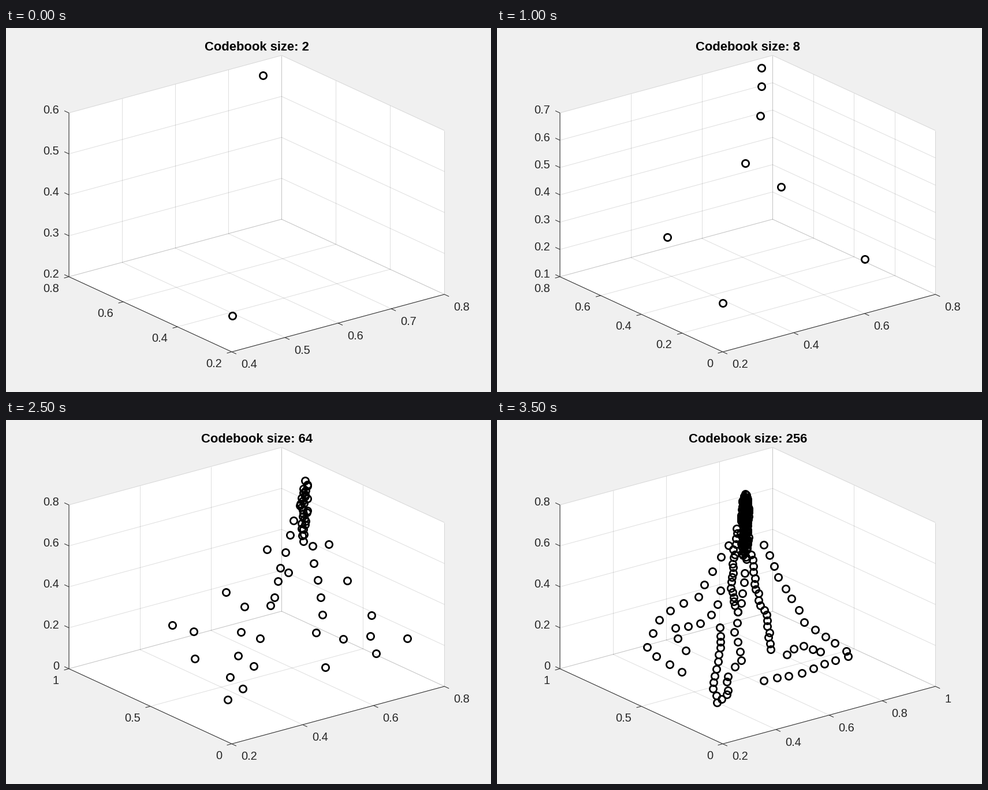
A matplotlib script that plays this animation: 840x630 px, repeating every 4000 ms.

```python
import numpy as np
import matplotlib.pyplot as plt
from matplotlib.animation import FuncAnimation

W, H, DPI = 840, 630, 100
PX = 72 / DPI                      # points per pixel
INK = "#262626"
plt.rcParams["font.family"] = "Liberation Sans"

# Corners of the box floor on the stage, and its height
LEFT, FRONT, RIGHT = map(np.array, ((109, 430.5), (391, 560.5), (759.3, 461)))
UP = np.array((0, -283.5))
X_DIR, Y_DIR = RIGHT - FRONT, LEFT - FRONT

# Tick ranges (low, high, step) for x, y, z
NEAR_X, WIDE_X = (0.4, 0.8, 0.1), (0.2, 0.8, 0.2)
UNIT_Y = (0, 1, 0.5)
MID_Z, FULL_Z = (0.1, 0.7, 0.1), (0, 0.8, 0.2)
FULL_VIEW = ((0.2, 1, 0.2), UNIT_Y, FULL_Z)
VIEWS = [
    (NEAR_X, (0.2, 0.8, 0.2), (0.2, 0.6, 0.1)),
    (NEAR_X, (0.2, 0.8, 0.2), MID_Z),
    (WIDE_X, (0, 0.8, 0.2), MID_Z),
    (WIDE_X, UNIT_Y, MID_Z),
    (WIDE_X, UNIT_Y, FULL_Z),
    (WIDE_X, UNIT_Y, FULL_Z),
    FULL_VIEW,
    FULL_VIEW,
]

# The smallest codebooks, on the stage
SMALL = [
    [(445, 82), (392, 498)],
    [(446, 88), (451, 174), (481, 373), (391, 499)],
    [(458, 69), (458, 101), (456, 152), (430, 234),
     (492, 275), (295, 362), (637, 400), (391, 476)],
]

# Larger ones lie on strands: points at full size, then knots as
# (stage x, stage y, data x) in the full view
STRANDS = [
    (13, [(407, 204, .72), (380, 250, .6), (348, 306, .5), (285, 338, .33),
          (257, 388, .29), (285, 418, .4), (334, 442, .43)]),
    (20, [(458, 204, .78), (495, 286, .76), (534, 350, .76), (616, 406, .76),
          (590, 416, .75), (525, 438, .75), (452, 455, .5)]),
    (18, [(416, 185, .76), (411, 222, .72), (406, 285, .63), (416, 335, .5)]),
    (18, [(440, 228, .78), (446, 275, .78), (454, 312, .76), (469, 345, .74),
          (470, 375, .68), (472, 402, .58)]),
    (12, [(430, 255, .68), (424, 310, .5), (412, 365, .38), (425, 415, .34),
          (396, 449, .28)]),
    (8, [(388, 285, .5), (380, 330, .42), (350, 352, .36), (305, 362, .3),
         (332, 408, .35)]),
    (16, [(385, 355, .36), (386, 410, .3), (375, 460, .25), (380, 490, .24),
          (400, 475, .28), (396, 449, .3)]),
    (5, [(497, 413, .6), (521, 390, .7), (570, 402, .74)]),
]
COLUMN = [(430, 126, .785), (428, 246, .74)]


def limits(view):
    return np.array(view)[:, :2].T


def project(data, view):
    lo, hi = limits(view)
    return FRONT + (data - lo) / (hi - lo) @ np.array((X_DIR, Y_DIR, UP))


def lift(knots):
    """Data coordinates of knots given in the full view."""
    knots = np.array(knots, float)
    lo, hi = limits(FULL_VIEW)
    tx = (knots[:, 2] - lo[0]) / (hi[0] - lo[0])
    dx, dy = (knots[:, :2] - FRONT - np.outer(tx, X_DIR)).T
    ty = dx / Y_DIR[0]
    tz = (dy - ty * Y_DIR[1]) / UP[1]
    return lo + np.column_stack((tx, ty, tz)) * (hi - lo)


def along(knots, t):
    """Data points at shares t of a polyline's stage length."""
    steps = np.hypot(*np.diff(np.array(knots)[:, :2], axis=0).T)
    dist = np.concatenate(([0], np.cumsum(steps))) / steps.sum()
    return np.column_stack([np.interp(t, dist, c) for c in lift(knots).T])


def cloud(i):
    if i < len(SMALL):
        return np.array(SMALL[i])
    size, view = 2 ** (i + 1), VIEWS[i]
    rng = np.random.default_rng(i)
    parts = []
    for full, knots in STRANDS:
        n = round(full * (size / 256) ** 0.85)
        p = project(along(knots, (np.arange(n) + 0.5) / n), view)
        parts.append(p + rng.uniform(-2, 2, p.shape))

    # The rest crowd into a column, sparse at both ends
    n = size - sum(map(len, parts))
    q = (np.arange(n) + rng.random(n)) / n
    t = (0.5 - np.sin(np.arcsin(1 - 2 * q) / 3)) ** 1.3
    p = project(along(COLUMN, t), view)
    p[:, 0] += 7 * np.minimum(1, 0.2 + 4 * t) * rng.uniform(-1, 1, n)
    return np.vstack(parts + [p])


fig = plt.figure(figsize=(W / DPI, H / DPI), dpi=DPI, facecolor="#f0f0f0")
ax = fig.add_axes([0, 0, 1, 1])


def line(*pts, alpha=1.0):
    ax.plot(*np.array(pts).T, color=INK, lw=PX, alpha=alpha, solid_capstyle="butt")


def grid(*pts):
    line(*pts, alpha=0.15)


def label(value, x, y, right=False):
    s = f"{value:.3g}"
    if right:
        x -= 20 * (0.556 * len(s) - 0.278 * s.count("."))
    ax.text(x, y + 7, s, size=20 * PX, color=INK, va="baseline")


def tick(p, toward):
    line(p, p + 8.7 * toward / np.hypot(*toward))


def ticks(lo, hi, step):
    """Tick values and their shares of the axis."""
    t = np.linspace(0, 1, round((hi - lo) / step) + 1)
    return list(zip(lo + t * (hi - lo), t))


def draw_box(view):
    back = LEFT + X_DIR
    outline = [LEFT, FRONT, RIGHT, RIGHT + UP, back + UP, LEFT + UP]
    ax.fill(*np.array(outline).T, color="white", lw=0)
    xs, ys, zs = (ticks(*r) for r in view)

    for v, t in xs:
        p, wall = FRONT + t * X_DIR, LEFT + t * X_DIR
        grid(p, wall)
        grid(wall, wall + UP)
        tick(p, -Y_DIR)
        label(v, p[0] + 16, p[1] + 21)
    for v, t in ys:
        p, wall = FRONT + t * Y_DIR, RIGHT + t * Y_DIR
        grid(p, wall)
        grid(wall, wall + UP)
        tick(p, -X_DIR)
        label(v, p[0] - 17, p[1] + 19.3, right=True)
    for v, t in zs:
        p = LEFT + t * UP
        grid(p, back + t * UP)
        grid(back + t * UP, RIGHT + t * UP)
        tick(p, Y_DIR)
        label(v, p[0] - 16.6, p[1] - 5.5, right=True)
    line(LEFT + UP, LEFT, FRONT, RIGHT)


def draw(i):
    ax.clear()
    ax.axis("off")
    ax.set_xlim(0, W)
    ax.set_ylim(H, 0)
    draw_box(VIEWS[i])
    ax.plot(*cloud(i).T, "o", ms=12.2 * PX, mfc="none", mec="black", mew=2.8 * PX)
    ax.text(434.5, 39, f"Codebook size: {2 ** (i + 1)}", size=22 * PX,
            weight="bold", ha="center", va="baseline", color="black")
    return []


anim = FuncAnimation(fig, draw, frames=len(VIEWS), interval=500,
                     init_func=lambda: [], repeat=True, repeat_delay=0)
plt.show()
```
